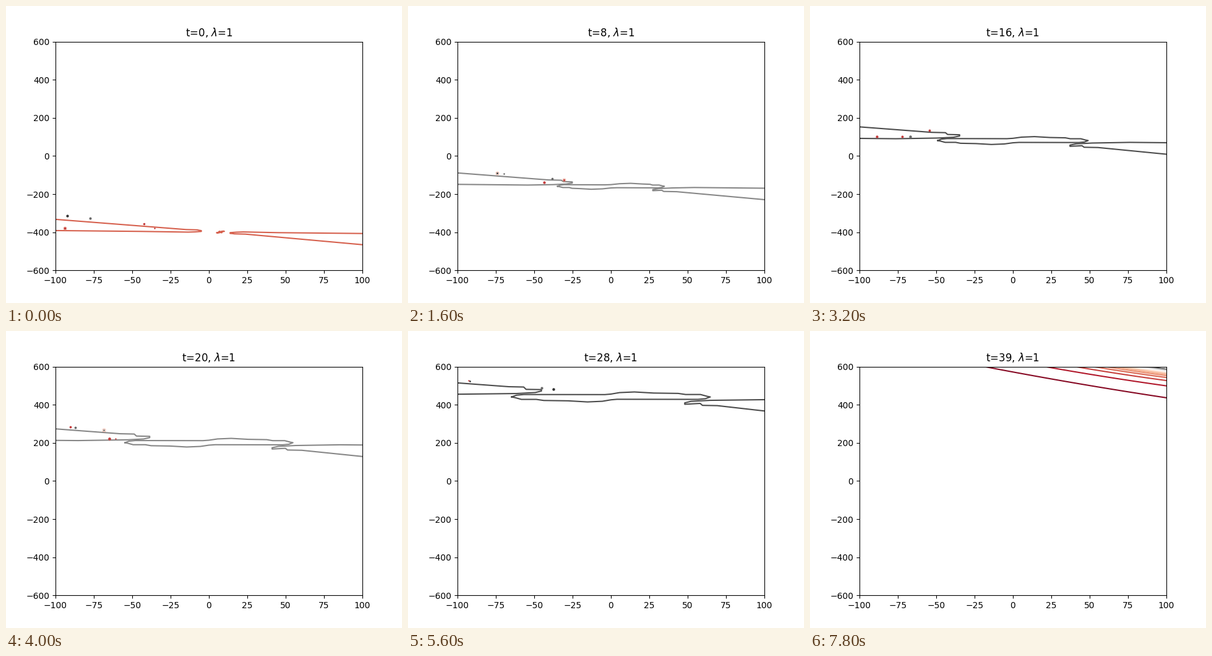
Write a matplotlib script that moves like this. It is 640 px wide and 480 px high and loops after 8 s.

```python
import numpy as np
import matplotlib.pyplot as plt
from matplotlib.animation import FuncAnimation

FRAMES, STEP = 40, 200
LATE, FAN = 32, 35           # steps at which new patterns take over
UNIT = 1200 / 369.6          # data units per pixel, vertically
CMAP = plt.get_cmap("RdGy")
TONES = [0.2, 0.9, 0.8, 0.1, 0.9, 0.7, 0.1, 0.9, 0.8]

fig, ax = plt.subplots(figsize=(6.4, 4.8), dpi=100)


def trace(points, t, shade, width=1.5):
    """Draw (x, pixels below the wave centre); the centre climbs steadily."""
    x, drop = np.asarray(points).T
    ax.plot(x, -399 + 30 * t - drop * UNIT, color=CMAP(shade), lw=width)


def loop(s):
    """Closed middle contour: one half and its point reflection."""
    half = np.array([
        (-12.2 * s, 0), (-11.6 * s, -0.7 - 0.4 * s),
        (-10.7 * s, -1 - 0.55 * s), (-4, -0.6 - 0.6 * s),
        (0, -0.4 - 0.8 * s), (5.6, -0.8 - 1.17 * s),
        (10 + s, -1 - 1.33 * s), (12 + 3 * s, -0.7 - 1.05 * s),
        (4 + 7.5 * s, -0.4 - s), (2 + 8.8 * s, 0.3 - 0.8 * s),
        (11 * s, 0.3 - 0.8 * s), (11.8 * s, -0.2 * s)])
    half[:, 0] *= min(1, s / 2)
    return np.vstack([half, -half, half[:1]])


def tongue(s, tip, bulk=1):
    """Folded sheet coming in from the left and turning back at the tip."""
    lump = min(-45, -19 * s)
    return np.array([
        (-100, -20.3 - 0.45 * s),
        (tip - 9 - 2.3 * s, bulk * (-3 - 2.55 * s)),
        (tip - 2 - 1.8 * s, bulk * (-2.5 - 2.55 * s)),
        (tip - 1 - 1.7 * s, bulk * (-2.2 - 1.9 * s)),
        (tip, -1.5 - 1.95 * s), (tip, -0.3 - 1.75 * s),
        (tip - 4, 0.3 - 1.4 * s), (tip - 8 - 1.6 * s, 0.6 - 1.15 * s),
        (lump, -1 - 0.12 * s * s), (-130, -3 - 0.3 * s)])


def draw_sheets(t, shade):
    s = np.sqrt(t + 0.15)
    shift = 7.5 * np.exp(-t)
    trace(tongue(s, -1.8 - 8.2 * s), t, shade)
    trace(loop(s) + (shift, 0), t, shade)
    trace(-tongue(s, -3 - 8.5 * s - shift, 0.85), t, shade)


def draw_specks(t):
    rng = np.random.default_rng(t)
    for x in rng.uniform(-95, -30, rng.integers(3, 6)):
        below = rng.random() < 0.25
        drop = -6 if below else -26 + (x + 92) * 0.25
        y = -399 + 30 * t - drop * UNIT
        ax.plot(x, y, "o", ms=rng.uniform(1.6, 3.4), mew=0,
                color=CMAP(rng.choice([0.15, 0.85, 0.95])))
        if rng.random() < 0.25:
            ax.plot(x, y, "h", ms=4, mfc="none", mew=0.4, mec=CMAP(0.25))


def packet(t, start, end, half, inset, levels, shade, rise=0.07):
    """Nested lens contours along the line from start to end."""
    a = np.linspace(0, 2 * np.pi, 60)
    (x0, d0), (x1, d1) = start, end
    for i in range(levels):
        cut = inset * i / (x1 - x0)
        u = cut + (1 - 2 * cut) * (1 - np.cos(a)) / 2
        drop = d0 + (d1 - d0) * u + half * (1 - i / levels) * np.sin(a)
        tone = shade + rise * i
        trace(np.column_stack([x0 + (x1 - x0) * u, drop]), t, tone,
              1 if 0.5 < tone < 0.7 else 1.5)


def draw_packets(t):
    packet(t, (-60, 0.6), (-25, 5.2), 1.4, 8, 2, 0.61, 0)
    packet(t, (24, -5.6), (64, 0.2), 2, 8, 2, 0.61, 0)
    packet(t, (-98, -2.9), (-80, -2.6), 1, 3, 2, 0.8)
    packet(t, (-33, -11.6), (-7, -11.6), 0.8, 0, 1, 0.92)
    packet(t, (-103, -9), (-96, -9), 3, 0.5, 2, 0.35, -0.1)
    packet(t, (71, 1), (125, 4.2), 2.3, 6, 3, 0.77, 0.09)
    packet(t, (7, 12), (193, 46), 6.5, 13, 4, 0.77)
    u = np.linspace(0, 1, 20)
    trace(np.column_stack([88 + 12 * u ** 3, 6 + 14 * u]), t, 0.61, 1)


def draw_fan(t):
    grow = 1 - 0.02 * (FRAMES - 1 - t)
    u = np.linspace(0, 1, 30)
    for i in reversed(range(18)):
        width = 118.5 * grow / (1 + 0.5 * i)
        drop = 50.3 * UNIT * grow / (1 + 0.62 * i)
        ax.plot(100 - width * (1 - u), 600 - drop * (u + 0.12 * u * (1 - u)),
                color=CMAP(0.045 + 0.056 * i), lw=1.5)


def update(t):
    for line in ax.lines[:]:
        line.remove()
    ax.set_title(rf"t={t}, $\lambda$=1")
    if t >= FAN:
        draw_fan(t)
        return ax.lines
    draw_sheets(t, TONES[t % len(TONES)])
    if t >= LATE:
        draw_packets(t)
    else:
        draw_specks(t)
    return ax.lines


def reset():
    ax.set_xlim(-100, 100)
    ax.set_ylim(-600, 600)
    return update(0)


reset()
anim = FuncAnimation(fig, update, frames=FRAMES, init_func=reset,
                     interval=STEP, repeat=True, repeat_delay=0, blit=False)
plt.show()
```
